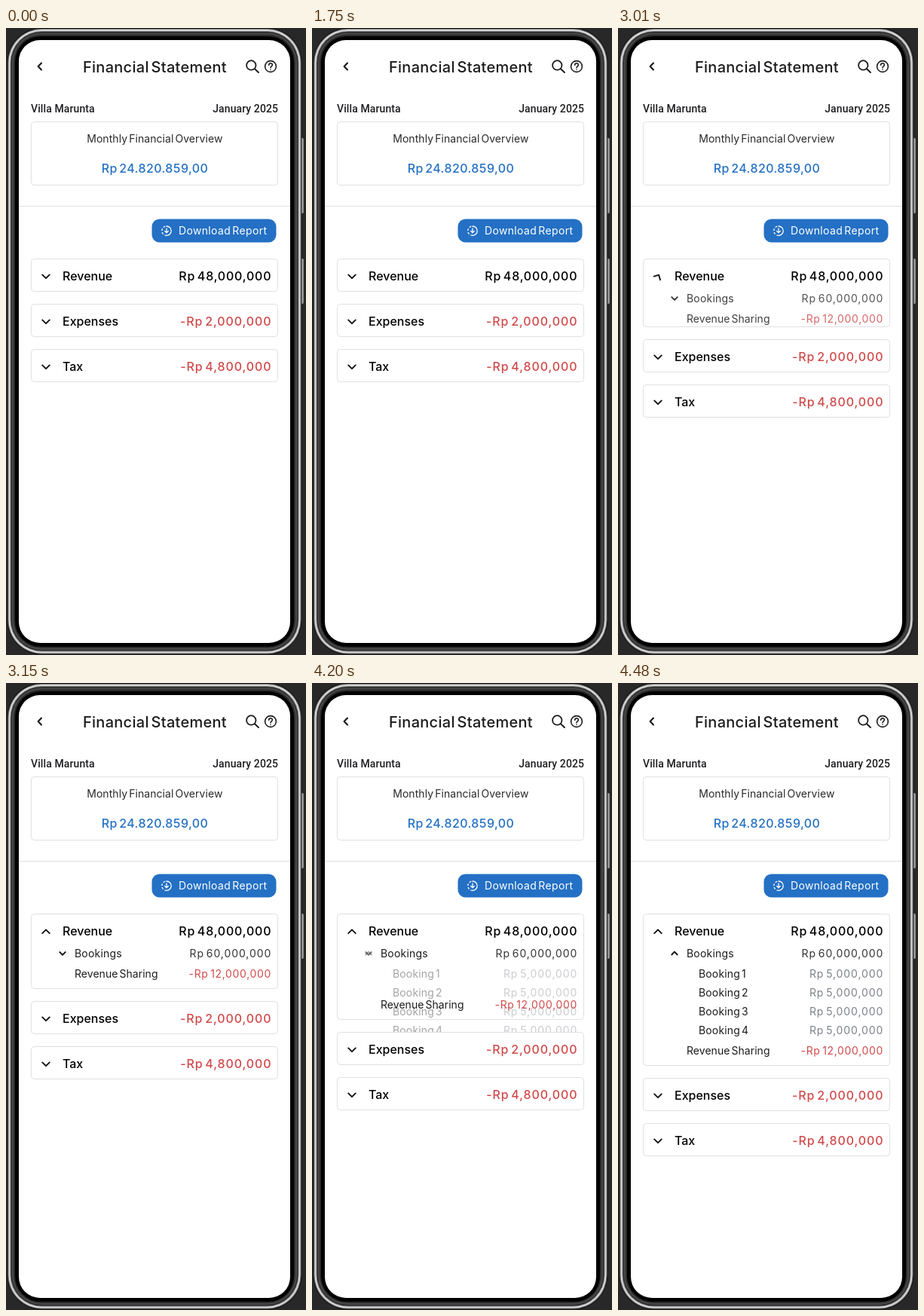
An HTML page for the animation above (6790 ms loop, 398 px wide and 832 px high).

```html
<!DOCTYPE html>
<html lang="en">
<head>
<meta charset="utf-8">
<title>Financial Statement</title>
<style>
  html, body { margin: 0; width: 100%; height: 100%; overflow: hidden; background: #282828; }
  svg { display: block; width: 100%; height: 100%; }
  text {
    font-family: Inter, "Open Sans", sans-serif;
    font-optical-sizing: none; word-spacing: -.14em; white-space: pre;
  }
  .roboto { font-family: Roboto, Arial, sans-serif; word-spacing: 0; }
  .line { fill: none; stroke-linecap: round; stroke-linejoin: round; }
</style>
</head>
<body>
<svg id="stage" viewBox="0 0 398 832" xmlns="http://www.w3.org/2000/svg">
  <defs>
    <linearGradient id="button" x1="0" y1="0" x2="1" y2="0">
      <stop offset="0" stop-color="#666"/>
      <stop offset=".6" stop-color="#c4c4c4"/>
      <stop offset="1" stop-color="#777"/>
    </linearGradient>
  </defs>
  <g id="phone"></g>
  <g id="header"></g>
  <g id="list"></g>
</svg>
<script>
const LOOP = 6790, STEP = 70;
const INK = '#111', RED = '#d04a4b', BLUE = '#2470c4', BORDER = '#dfe0e2';
const NS = 'http://www.w3.org/2000/svg';
const $ = id => document.getElementById(id);

function add(parent, tag, attrs, content) {
  const el = document.createElementNS(NS, tag);
  for (const k in attrs) el.setAttribute(k, attrs[k]);
  if (content) el.textContent = content;
  parent.appendChild(el);
  return el;
}

const group = parent => add(parent, 'g', {});

function box(parent, x, y, w, h, r, fill, stroke) {
  return add(parent, 'rect', { x, y, width: w, height: h, rx: r, fill, stroke: stroke || 'none' });
}

function label(parent, str, x, y, o = {}) {
  const gap = o.gap || 0;
  const anchor = o.anchor || 'start';
  // letter spacing also trails the last glyph
  const shift = { start: 0, middle: gap / 2, end: gap }[anchor];
  return add(parent, 'text', {
    x: x + shift, y, fill: o.fill || INK, 'font-size': o.size || 14,
    'font-weight': o.weight || 400, 'text-anchor': anchor,
    'letter-spacing': gap, class: o.cls || ''
  }, str);
}

function line(parent, d, stroke, width) {
  return add(parent, 'path', { d, stroke, 'stroke-width': width, class: 'line' });
}

// phone body
const phone = $('phone');
box(phone, 389, 146, 6, 100, 2, 'url(#button)');
box(phone, 389, 306, 6, 60, 2, 'url(#button)');
box(phone, 1.5, 0, 391, 831.5, 46, '#111');
box(phone, 2.5, 1, 389, 829.5, 45, '#777');
box(phone, 3.5, 2, 387, 827.5, 44, '#d6d6d6');
box(phone, 5.5, 4, 383, 823.5, 42, '#7c7c7c');
box(phone, 6.5, 5, 381, 821.5, 41, '#2a2a2a');
box(phone, 8, 6.5, 378, 818.5, 39, '#484848');
box(phone, 10, 8.5, 374, 814.5, 37, '#2c2c2c');
box(phone, 12, 11, 370, 810, 34, '#000');
box(phone, 17, 16, 360, 800, 28, '#fff');

// header and overview
const header = $('header');
line(header, 'M47 46.5L42.6 51L47 55.5', INK, 2);
label(header, 'Financial Statement', 197.3, 58.6, { size: 20, weight: 500, anchor: 'middle', gap: 0.28, fill: '#1c1c1e' });
add(header, 'circle', { cx: 325.3, cy: 49.4, r: 6.2, fill: 'none', stroke: '#1c1c1e', 'stroke-width': 1.8 });
line(header, 'M330 54.2L335 59', '#1c1c1e', 1.9);
add(header, 'circle', { cx: 351, cy: 51, r: 7.4, fill: 'none', stroke: '#1c1c1e', 'stroke-width': 1.6 });
line(header, 'M348.7 49.2C348.7 45.9 353.5 46.1 353.4 49C353.3 50.9 351 50.8 351 52.7M351 55V55.1', '#1c1c1e', 1.6);

const caption = { cls: 'roboto', weight: 500, gap: 0.1, fill: '#1f1f22' };
label(header, 'Villa Marunta', 33, 112, caption);
label(header, 'January 2025', 361, 112, { ...caption, anchor: 'end' });
box(header, 33.5, 124.5, 327, 84, 4, '#fff', BORDER);
label(header, 'Monthly Financial Overview', 197.3, 152, { anchor: 'middle', gap: 0.06, fill: '#2a2a2c' });
label(header, 'Rp 24.820.859,00', 197.3, 191.8, { size: 16, weight: 500, anchor: 'middle', gap: 0.4, fill: BLUE });
box(header, 17, 236, 360, 1, 0, '#dedfe1');

box(header, 193.5, 253.5, 165, 31, 10, BLUE);
line(header, 'M213 263A6.2 6.2 0 0 1 213 275.4', '#fff', 1.3);
add(header, 'path', {
  d: 'M213 275.4A6.2 6.2 0 0 1 213 263', fill: 'none', stroke: '#fff',
  'stroke-width': 1.3, 'stroke-dasharray': '2.8 2'
});
line(header, 'M213 266V271.6M210.6 269.4L213 271.8L215.4 269.4', '#fff', 1.3);
label(header, 'Download Report', 229, 274.3, { gap: 0.34, fill: '#fff' });

// accordion
const list = $('list');
const CHEVRON = 'M-4.8 -2.4L0 2.4L4.8 -2.4';
const SMALL = 'M-3.7 -1.9L0 1.9L3.7 -1.9';

function chevron(parent, x, y, d, flip) {
  const g = group(parent);
  g.setAttribute('transform', `translate(${x} ${y}) scale(1 ${flip ? -1 : 1})`);
  return line(g, d, INK, 1.9);
}

function section(name, amount, y, color, gap) {
  const g = group(list);
  const card = box(g, 33.5, y + 0.5, 327, 43, 4, '#fff', BORDER);
  const arrow = chevron(g, 53, y + 23.8, CHEVRON);
  label(g, name, 75, y + 28.8, { size: 16, weight: 500, fill: '#000' });
  label(g, amount, 351.5, y + 28.8, { size: 16, weight: 500, anchor: 'end', gap, fill: color });
  return { g, card, arrow };
}

function row(parent, name, amount, x, y, color, gaps) {
  label(parent, name, x, y, { gap: gaps[0], fill: '#1c1c1e' });
  label(parent, amount, 351.3, y, { anchor: 'end', gap: gaps[1], fill: color });
}

const revenue = section('Revenue', 'Rp 48,000,000', 306, '#000', 0.78);

const units = group(revenue.g);
for (let i = 0; i < 4; i++) {
  row(units, 'Booking ' + (i + 1), 'Rp 5,000,000', 107, 391 + 25 * i, '#7d808a', [0.15, 0.9]);
}

const details = group(revenue.g);
row(details, 'Bookings', 'Rp 60,000,000', 91, 364, '#333436', [0.2, 0.92]);
const down = chevron(details, 75, 359, SMALL);
const up = chevron(details, 75, 358.6, SMALL, true);
const sharing = group(details);
row(sharing, 'Revenue Sharing', '-Rp 12,000,000', 91, 391, RED, [0.04, 0.65]);

const expenses = section('Expenses', '-Rp 2,000,000', 366, RED, 0.88);
const tax = section('Tax', '-Rp 4,800,000', 426, RED, 0.88);

// cubic-bezier(0, 0, .58, 1), solved for its parameter by bisection
function easeOut(x) {
  if (x <= 0) return 0;
  if (x >= 1) return 1;
  let lo = 0, hi = 1;
  for (let i = 0; i < 24; i++) {
    const s = (lo + hi) / 2;
    if (1.74 * (1 - s) * s * s + s * s * s < x) lo = s; else hi = s;
  }
  return lo * lo * (3 - 2 * lo);
}

const moveY = (el, y) => el.setAttribute('transform', `translate(0 ${y.toFixed(2)})`);

function draw(time) {
  const t = Math.floor((time % LOOP) / STEP) * STEP;
  const open = easeOut((t - 2801) / 315);
  const unfold = easeOut((t - 4107) / 350);
  const shift = Math.round(56 * open + 102 * unfold);

  revenue.card.setAttribute('height', 43 + shift);
  revenue.arrow.setAttribute('transform', `rotate(${-180 * open})`);
  details.setAttribute('opacity', open);
  units.setAttribute('opacity', unfold);
  down.setAttribute('opacity', 1 - unfold);
  up.setAttribute('opacity', unfold);
  moveY(sharing, 102 * unfold);
  moveY(expenses.g, shift);
  moveY(tax.g, shift);
}

const start = performance.now();
function tick() {
  draw(performance.now() - start);
  requestAnimationFrame(tick);
}
tick();
</script>
</body>
</html>
```
